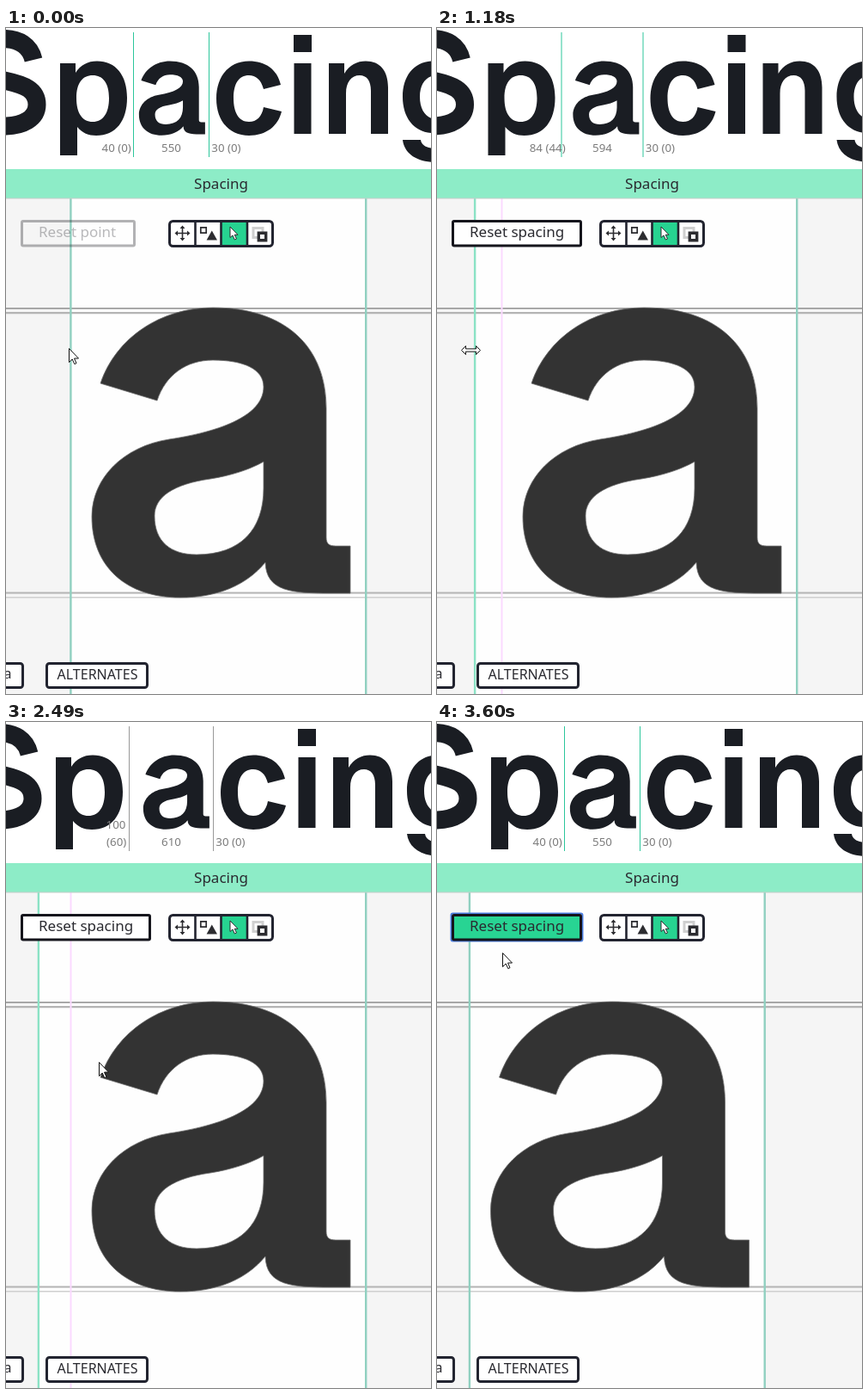
Animation of 495x774 px, one loop 3650 ms. Source, as an HTML page:

```html
<!DOCTYPE html>
<html lang="en">
<head>
<meta charset="utf-8">
<title>Spacing</title>
<style>
html, body { margin: 0; width: 100%; height: 100%; overflow: hidden; background: #fff; }
svg { display: block; width: 495px; height: 774px; }
text { font: 17px "Noto Sans", "Open Sans", sans-serif; fill: #2a2a30; }
.num text { font-size: 13.3px; fill: #7b7b7b; }
.mid { text-anchor: middle; }
.ink { fill: #1a1d23; }
.box { fill: #fff; stroke: #222430; stroke-width: 3; }
.guide { stroke: #90d0c0; stroke-width: 2.4; }
.cursor path { fill: #fff; stroke: #111; stroke-linejoin: round; }
</style>
</head>
<body>
<svg viewBox="0 0 495 774">
  <defs>
    <path id="a" fill-rule="evenodd" d="M110 413C128 360 180 325 241 325C325 325 373 370 373 442V592C373 599 376 602 384 602H401V657H378C333 657 303 655 302 621C280 648 245 662 203 662C140 662 100 626 100 568C100 522 138 486 190 478C262 467 300 446 300 417C300 396 276 386 241 386C210 386 186 403 176 433ZM300 504C282 514 262 520 238 524C195 530 173 545 173 567C173 597 192 612 222 612C273 612 300 583 300 535Z"/>
  </defs>

  <!-- editor canvas -->
  <rect y="198" width="495" height="576" fill="#f5f5f5"/>
  <g id="scene">
    <rect id="paper" y="198" height="576" fill="#fefefe"/>
  </g>
  <g fill="none">
    <path d="M0 325.8H495" stroke="#9c9c9c" stroke-width="1.8"/>
    <path d="M0 331.2H495M0 656.5H495" stroke="#b4b4b4" stroke-width="2.2"/>
    <path d="M0 661.8H495" stroke="#cfcfcf" stroke-width="1.4"/>
  </g>
  <g id="glyph">
    <use href="#a" fill="#333" stroke="#6c6c6c" stroke-width=".8"/>
    <path id="ghost" d="M75.5 198V774" stroke="#fbd9ff" stroke-width="2"/>
    <path id="left" class="guide" d="M0 198V774"/>
    <path class="guide" d="M419.2 198V774"/>
  </g>

  <!-- specimen -->
  <rect width="495" height="164" fill="#fff"/>
  <g id="before" class="ink">
    <path d="M32 37C28 20 15 12.5 -4 12.5C-26 12.5 -38 22 -38 36C-38 52 -24 56 -2 61C22 66 36 72 36 89C36 105 20 114 -3 114C-26 114 -40 104 -44 88" fill="none" stroke="#1a1d23" stroke-width="21"/>
    <path fill-rule="evenodd" d="M63 41H81V52C87 43 95 38.5 106 38.5C128 38.5 141 55 141 81C141 108 128 125 105 125C96 125 89 122 83 115V148H63ZM101 55C89 55 82 64 82 81.5C82 99 89 109 101 109C113 109 120 99 120 81.5C120 64 113 55 101 55Z"/>
  </g>
  <g id="after" class="ink">
    <use href="#a" transform="translate(129.3 -44.6) scale(.2558)"/>
    <path d="M320 66L300 71C297 60 291 55 283 55C271 55 265 65 265 81.5C265 98 271 109 283 109C292 109 298 103 300 92L321 97C317 114 303 125 283 125C260 125 245 108 245 82C245 56 260 38.5 283 38.5C302 38.5 316 48 320 66Z"/>
    <path d="M335 8H356V28H335ZM335.5 41H355.5V123H335.5Z"/>
    <path d="M376 41H394V53C400 43 409 38.5 419 38.5C436 38.5 445 50 445 69V123H425V73C425 61 420 55 412 55C402 55 396 63 396 76V123H376Z"/>
    <path fill-rule="evenodd" d="M541 41H523V52C517 43 509 38.5 498 38.5C476 38.5 462 55 462 80C462 105 476 122 498 122C508 122 515 118 521 112V120C521 134 514 140 502 140C491 140 484 137 483 130H462C464 146 478 156 502 156C528 156 541 145 541 118ZM502 55C490 55 482 64 482 80C482 96 490 106 502 106C514 106 521 96 521 80C521 64 514 55 502 55Z"/>
  </g>
  <path id="bearings"/>
  <g class="num">
    <text id="wrap" class="mid" x="128" y="124"></text>
    <text id="lsb" class="mid" x="128.7" y="144"></text>
    <text id="adv" class="mid" x="192.5" y="144"></text>
    <text id="rsb" y="144">30 (0)</text>
  </g>

  <!-- title bar -->
  <rect y="164" width="495" height="34" fill="#8decc7"/>
  <path d="M0 198H495" stroke="#c3cdc9"/>
  <text class="mid" x="250.5" y="187">Spacing</text>

  <!-- controls -->
  <g id="reset">
    <rect id="focus" x="16.5" y="222.5" width="153" height="32" rx="2" fill="none" stroke="#4a7de0" stroke-width="2"/>
    <rect id="face" class="box" x="18.5" y="224.5" height="28.5" rx="1.5" style="stroke:#15151c"/>
    <text id="label" x="38" y="243"></text>
  </g>
  <rect class="box" x="190.5" y="224.5" width="120" height="29" rx="4"/>
  <path d="M251 226H280V252H251Z" fill="#27d391"/>
  <path d="M220.5 224V254M250.5 224V254M281 224V254" stroke="#222430" stroke-width="2.6"/>
  <g fill="#2c2c30">
    <path d="M199 238.5H212M205.5 232V245" stroke="#2c2c30" stroke-width="1.6"/>
    <path d="M205.5 229.5L208.5 233H202.5ZM205.5 247.5L208.5 244H202.5ZM196.5 238.5L200 235.5V241.5ZM214.5 238.5L211 235.5V241.5Z"/>
    <path d="M226.8 231.8H233.2V238.2H226.8Z" fill="none" stroke="#2c2c30" stroke-width="1.7"/>
    <path d="M239.8 235.5L246 246.5H233.6Z"/>
    <path d="M261 231V243.5L264 241L266.3 246L268.5 245L266.2 240.3H270Z" fill="#fff" stroke="#2c2c30"/>
    <path d="M288 232.5H299V243.5H288Z" fill="none" stroke="#cfcfcf" stroke-width="3"/>
    <path d="M294.3 238.3H302.7V246.7H294.3Z" fill="#fff" stroke="#2c2c30" stroke-width="3.4"/>
  </g>
  <rect class="box" x="-20" y="738.5" width="39.5" height="28" rx="3"/>
  <text x="6.5" y="756" text-anchor="end" style="font-size:16px">a</text>
  <rect class="box" x="47.5" y="738.5" width="117" height="28" rx="3"/>
  <text class="mid" x="106.5" y="757" style="font-size:16px">ALTERNATES</text>

  <g id="cursor" class="cursor">
    <path id="arrow" d="M.5 .5V16.5L4.2 12.9L6.8 18.6L9 17.6L6.5 12H11.5Z"/>
    <path id="resize" d="M-11 0L-6 -5V-1.6H6V-5L11 0L6 5V1.6H-6V5Z"/>
    <path id="hand" d="M-1.5 2.5C-1.5 0 2 0 2 2.5V8.5C3 7.5 4.8 8 5 9.2C6 8.4 7.6 8.9 7.8 10.2C9.2 9.6 10.5 10.5 10.5 12V17C10.5 20 9 21 9 23.5H-1C-1 21 -6.5 15.5 -6.5 13C-6.5 11 -4 11 -1.5 14ZM2 8.5V13M5 9.5V13M7.8 10.5V13"/>
  </g>
</svg>
<script>
const LOOP = 3650, START = 75.4, SCALE = 0.6255;
const $ = id => document.getElementById(id);
const set = (id, attrs) => {
  for (const k in attrs) $(id).setAttribute(k, attrs[k]);
};
const show = (id, on) => { $(id).style.display = on ? '' : 'none'; };

// time, cursor x, canvas spacing, specimen spacing
const DRAG = [
  [0, 76.5, 0, 0], [430, 72, 4, 0], [470, 64.5, 10, 0], [520, 57.5, 20, 0],
  [570, 55, 31, 0], [630, 53, 35, 0], [700, 51.5, 38, 4], [760, 50, 40, 10],
  [830, 49, 42, 20], [900, 48.5, 44, 31], [1000, 47, 45, 35], [1030, 45.5, 47, 38],
  [1180, 39.5, 50, 44], [1260, 39.5, 60, 44], [1490, 39.5, 60, 60]
];

// Progress from 0 to 1 in held steps, the first at `from`, the last at `to`.
function steps(t, from, to, n) {
  if (t < from) return 0;
  return Math.min(n, Math.floor((t - from) / (to - from) * (n - 1) + 1e-6) + 1) / n;
}
const mix = (a, b, k) => a + (b - a) * k;
const ease = k => k * k * (3 - 2 * k);

function pointer(t, dragX) {
  if (t < 60) return ['arrow', 73, 372];
  if (t < 1770) {
    const y = t < 200 ? 373.5 : t < 430 ? 374 : t < 1000 ? 375.5 : 374.5;
    return ['resize', dragX, y];
  }
  if (t < 2330) {
    const k = steps(t, 1770, 2010, 5);
    return ['arrow', mix(39, 122, k), mix(374, 465, k)];
  }
  if (t < 3520) {
    const k = ease(steps(t, 2330, 2810, 11)), y = mix(465, 233, k);
    return [y < 254 ? 'hand' : 'arrow', mix(122, 77, k), y];
  }
  const k = steps(t, 3520, 3600, 3), y = mix(233, 268, k);
  return [y < 254 ? 'hand' : 'arrow', mix(77, 76, k), y];
}

function specimen(extra) {
  const half = (550 + extra) * 0.08, snap = x => Math.round(x * 2) / 2;
  const l = snap(192.5 - half), r = snap(192.5 + half), wide = extra >= 60;
  set('before', { transform: `translate(${l - 148.5})` });
  set('after', { transform: `translate(${r - 236.5})` });
  set('bearings', { d: `M${l} 5V150M${r} 5V150`, stroke: wide ? '#999' : '#2cc69b' });
  $('wrap').textContent = wide ? 40 + extra : '';
  $('lsb').textContent = (wide ? '' : 40 + extra + ' ') + `(${extra})`;
  $('adv').textContent = 550 + extra;
  set('rsb', { x: r + 2.8 });
}

function canvas(extra, dragged, done) {
  const x = START - extra * SCALE, move = `translate(${done ? -37.5 : 0})`;
  set('scene', { transform: move });
  set('glyph', { transform: move });
  set('paper', { x, width: 419.2 - x });
  set('left', { transform: `translate(${x})` });
  $('left').style.stroke = dragged && !done ? '#8be2c5' : '';
  show('ghost', dragged && !done);
}

function button(t, dragged, hover) {
  const press = Math.min(1, Math.max(0, (t - 2860) / 150));
  const rgb = [[128, 40], [229, 212], [191, 147]].map(c => Math.round(mix(c[0], c[1], press)));
  set('reset', { opacity: dragged ? 1 : 0.32 });
  set('face', { width: dragged ? 149 : 131 });
  $('face').style.fill = !dragged ? 'none' : hover ? `rgb(${rgb})` : '#fff';
  $('label').textContent = dragged ? 'Reset spacing' : 'Reset point';
  show('focus', t >= 2860);
}

function draw(t) {
  const [, dragX, space, top] = DRAG.filter(d => d[0] <= t).pop();
  const dragged = t >= 430, done = t >= 3030;
  const [kind, x, y] = pointer(t, dragX);
  canvas(done ? 0 : space, dragged, done);
  specimen(t >= 3270 ? 0 : top);
  button(t, dragged, kind === 'hand' || t >= 2860);
  const px = kind === 'resize' ? x : Math.round(x);
  const py = kind === 'resize' ? y : Math.round(y);
  set('cursor', { transform: `translate(${px} ${py})` });
  for (const id of ['arrow', 'resize', 'hand']) show(id, id === kind);
}

const t0 = performance.now();
function tick() {
  draw((performance.now() - t0) % LOOP);
  requestAnimationFrame(tick);
}
tick();
</script>
</body>
</html>
```
